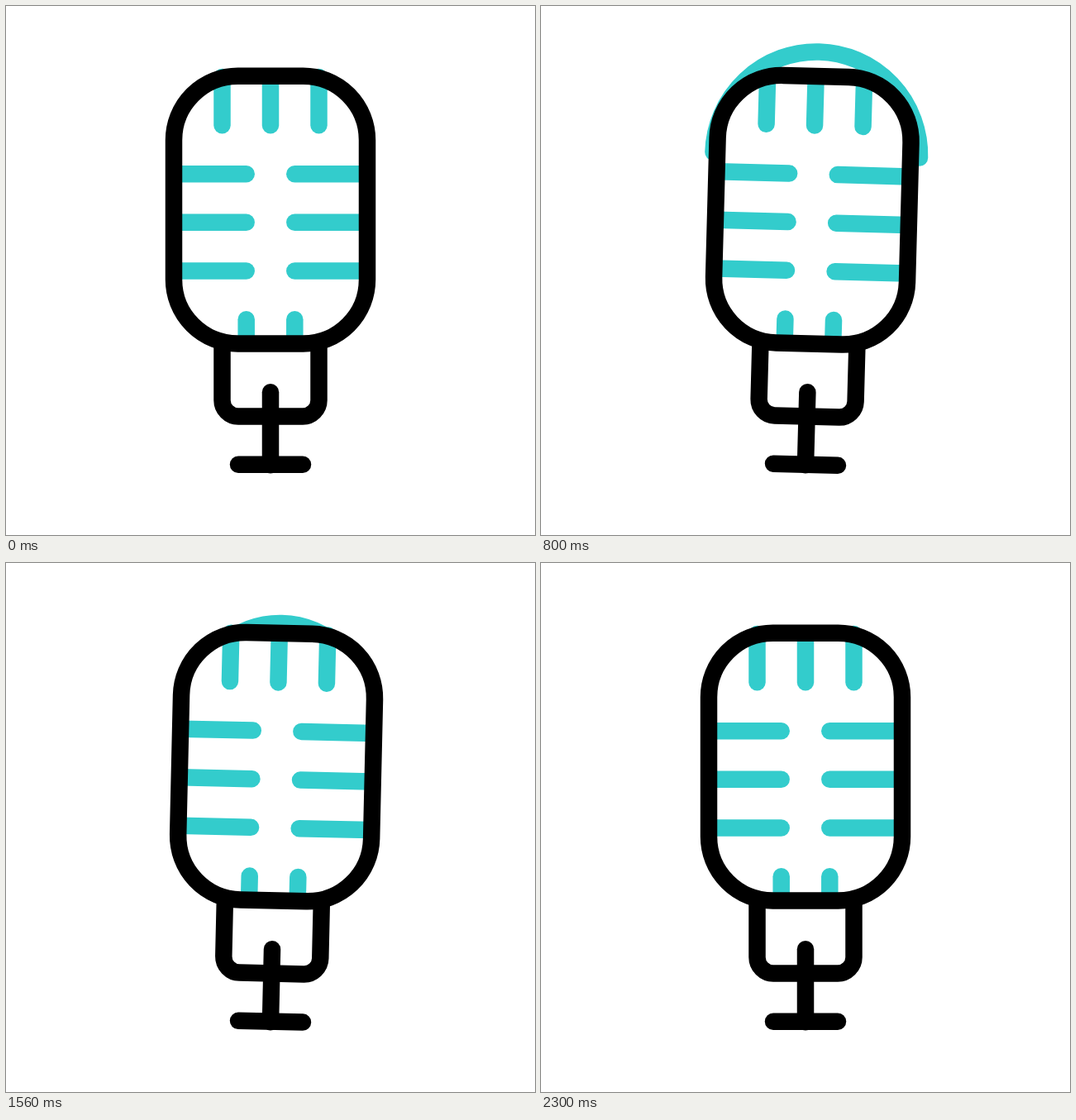
Recreate the animation shown at these times as an HTML page with a canvas. Size 640 by 640 pixels, loop 2400 ms.

```html
<!DOCTYPE html>
<html lang="en">
<head>
<meta charset="utf-8">
<title>Swinging microphone</title>
<style>
  html, body { margin: 0; width: 100%; height: 100%; overflow: hidden; background: #fff; }
  canvas { display: block; width: 640px; height: 640px; }
</style>
</head>
<body>
<canvas id="stage" width="640" height="640"></canvas>
<script>
const ctx = document.getElementById('stage').getContext('2d');
const LOOP = 2400, STEP = 20, LAST = 2300;
const TEAL = '#33cccc', BLACK = '#000';
const PIVOT = { x: 320, y: 555 };

// Swing extremes as [ms, degrees], eased in and out between them
const SWING = [[0, 0], [600, -25], [910, 12.3], [1200, -5.5], [1420, 3.5], [1660, 0], [LOOP, 0]];

// Moments at which each sound wave emerges above the head
const WAVES = [595, 1033, 1495, 1848];
const WAVE = { radius: 99, speed: 0.126, fadeFrom: 138, fadeTo: 155.6 };

const clamp = v => Math.min(1, Math.max(0, v));
const smooth = u => u * u * (3 - 2 * u);

function swingAngle(t) {
  const i = SWING.findIndex(([time]) => time > t);
  const [t0, a0] = SWING[i - 1], [t1, a1] = SWING[i];
  return a0 + (a1 - a0) * smooth((t - t0) / (t1 - t0));
}

function line(x1, y1, x2, y2) {
  ctx.beginPath();
  ctx.moveTo(x1, y1);
  ctx.lineTo(x2, y2);
  ctx.stroke();
}

function drawWave(age) {
  const radius = WAVE.radius + WAVE.speed * age;
  if (radius < 88 || radius >= WAVE.fadeTo) return;
  ctx.globalAlpha = clamp((WAVE.fadeTo - radius) / (WAVE.fadeTo - WAVE.fadeFrom));
  ctx.beginPath();
  ctx.arc(320 + radius * 0.025, 180, radius, Math.PI, 2 * Math.PI);
  ctx.stroke();
  ctx.globalAlpha = 1;
}

function drawGrille() {
  for (const x of [261.5, 320, 378.5]) line(x, 86, x, 144.3);
  for (const y of [203.2, 261.8, 320.4]) {
    line(205, y, 290.7, y);
    line(349.3, y, 435, y);
  }
  for (const x of [290.7, 349.3]) line(x, 379.2, x, 406);
}

function drawStand() {
  ctx.beginPath();
  ctx.moveTo(261.5, 408);
  ctx.lineTo(261.5, 477);
  ctx.arcTo(261.5, 496.5, 281, 496.5, 19.5);
  ctx.lineTo(359, 496.5);
  ctx.arcTo(378.5, 496.5, 378.5, 477, 19.5);
  ctx.lineTo(378.5, 408);
  ctx.stroke();
  line(320, 467.2, 320, 555.2);
  line(281, 554.7, 359, 554.7);
}

function draw(t) {
  ctx.fillStyle = '#fff';
  ctx.fillRect(0, 0, 640, 640);
  ctx.save();
  ctx.translate(PIVOT.x, PIVOT.y);
  ctx.rotate(swingAngle(t) * Math.PI / 180);
  ctx.translate(-PIVOT.x, -PIVOT.y);
  ctx.lineWidth = 20.5;
  ctx.lineCap = 'round';

  ctx.strokeStyle = TEAL;
  for (const start of WAVES) drawWave(t - start);

  const head = new Path2D();
  head.roundRect(203, 84.8, 234, 323.6, 77.5);
  ctx.fill(head);
  drawGrille();

  ctx.strokeStyle = BLACK;
  drawStand();
  ctx.stroke(head);
  ctx.restore();
}

function tick() {
  const t = performance.now() % LOOP;
  draw(Math.min(LAST, Math.floor(t / STEP) * STEP));
  requestAnimationFrame(tick);
}
tick();
</script>
</body>
</html>
```
